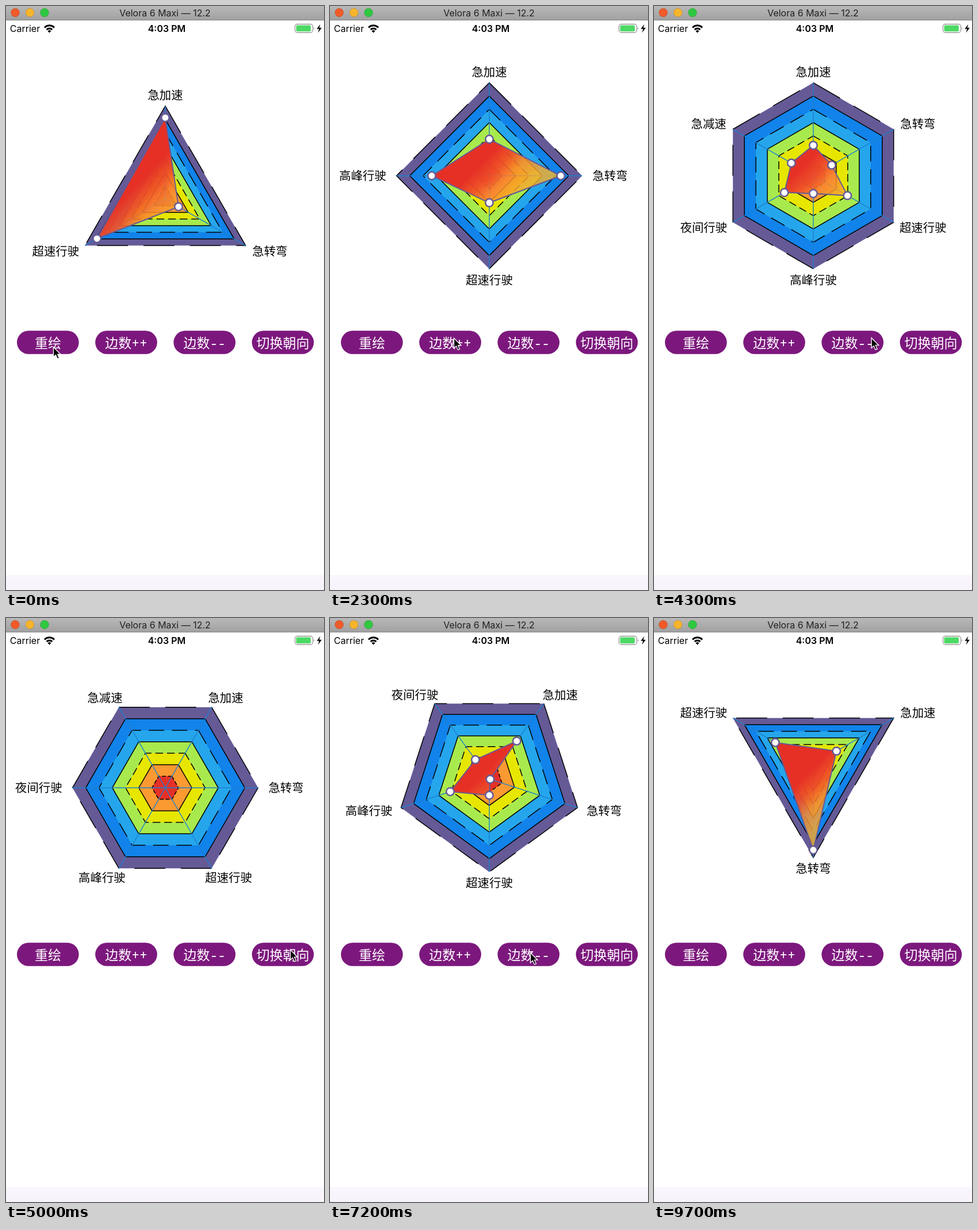
An HTML page for the animation above (10 s loop, 553 by 1013 pixels).

```html
<!DOCTYPE html>
<html lang="zh">
<head>
<meta charset="utf-8">
<title>Radar chart</title>
<style>
  html, body { margin: 0; width: 100%; height: 100%; overflow: hidden; background: #fff; }
  svg { display: block; width: 553px; height: 1013px; }
  text { text-anchor: middle; }
  .ui { font: 400 16px Inter, sans-serif; }
  .label { font: 500 20.4px "Noto Sans CJK SC", "Noto Sans CJK", sans-serif; }
  .btn { font: 300 23px "Noto Sans CJK SC", "Noto Sans CJK", sans-serif; fill: #fff; }
  .sign { font-family: "Noto Sans Mono", monospace; }
</style>
</head>
<body>
<svg viewBox="0 0 553 1013">
  <defs>
    <linearGradient id="bar" x2="0" y2="1">
      <stop stop-color="#b8b8b8"/><stop offset="1" stop-color="#a0a0a0"/>
    </linearGradient>
    <linearGradient id="foot" x2="0" y2="1">
      <stop stop-color="#faf6fd"/><stop offset="1" stop-color="#f8f3fb"/>
    </linearGradient>
    <linearGradient id="heat" gradientUnits="userSpaceOnUse" x1="260" y1="260" x2="365" y2="365">
      <stop offset=".08" stop-color="#e63026"/>
      <stop offset=".26" stop-color="#ef4f28" stop-opacity=".93"/>
      <stop offset=".41" stop-color="#f7852f" stop-opacity=".86"/>
      <stop offset=".62" stop-color="#f7a82d" stop-opacity=".82"/>
      <stop offset="1" stop-color="#e6c424" stop-opacity=".78"/>
    </linearGradient>
  </defs>

  <rect width="553" height="1013" fill="#fff"/>
  <rect y="987" width="553" height="26" fill="url(#foot)"/>
  <rect width="553" height="25" fill="url(#bar)"/>
  <rect y="24" width="553" height="1" fill="#858585"/>
  <g stroke-opacity=".15" stroke="#000">
    <circle cx="16" cy="11.5" r="7.5" fill="#f15a29"/>
    <circle cx="41.5" cy="11.5" r="7.5" fill="#f6b42c"/>
    <circle cx="67" cy="11.5" r="7.5" fill="#2fc840"/>
  </g>
  <text class="ui" x="276.5" y="17.5" fill="#222">Velora 6 Maxi — 12.2</text>

  <text class="ui" x="33" y="45">Carrier</text>
  <text class="ui" x="279.5" y="45" style="font-weight:600">4:03 PM</text>
  <g fill="none" stroke="#000" stroke-width="3">
    <path d="M67 37.3a12.2 12.2 0 0 1 17 0"/>
    <path d="M70.6 41a7 7 0 0 1 9.8 0"/>
  </g>
  <path d="M75.500 46.500l-3-3a4.300 4.300 0 0 1 6 0z"/>
  <rect x="502.500" y="31.500" width="31" height="14.500" rx="4" fill="none" stroke="#999" stroke-width="1.300"/>
  <rect x="504.500" y="33.500" width="25.500" height="10.500" rx="2" fill="#4cd964"/>
  <path d="M535 36.500q2.500 2.300 0 4.600z" fill="#999"/>
  <path d="M546.500 31.500l-6 8.200h4l-2 6.800 6.500-8.700h-4.200z"/>

  <g id="buttons"></g>
  <g id="chart"></g>
  <g id="data">
    <path id="area" fill="url(#heat)" stroke="#655a96" stroke-width="2"/>
    <g id="dots" fill="#fff" stroke="#655a96" stroke-width="2.5"></g>
  </g>
  <path id="cursor" d="M0 0V17.500L4 13.800L7 20.500L10 19.200L7.100 12.700H12.500Z" stroke="#fff" stroke-width="1.300"/>
</svg>
<script>
const $ = id => document.getElementById(id);
const CX = 277, CY = 294.5, R = 161.4, GROW = 1100, LOOP = 10000;
const NAMES = ['急加速', '急转弯', '超速行驶', '高峰行驶', '夜间行驶', '急减速'];
const COLORS = ['#e63026', '#fb9a31', '#e7e600', '#a8ea4d', '#25a6ec', '#1183ea', '#655a96'];

// each scene: start time, flipped orientation, one value per axis
const SCENES = [
  { at: -GROW, flip: 0, v: [.875, .165, .85] },
  { at: 100, flip: 0, v: [.52, .74, .43] },
  { at: 1200, flip: 0, v: [.393, .77, .29, .62] },
  { at: 2400, flip: 0, v: [.745, .453, .667, .615, .17] },
  { at: 3700, flip: 0, v: [.6, .42, .78, .35, .66, .5] },
  { at: 5000, flip: 1, v: [.48, .72, .36, .81, .55, .4] },
  { at: 6100, flip: 1, v: [.503, .01, .176, .443, .255] },
  { at: 7300, flip: 1, v: [.58, .86, .37, .69] },
  { at: 8600, flip: 1, v: [.289, .918, .473] }
];

// cursor stops: time, x, y
const STOPS = [
  [100, 82.5, 591.5], [1000, 215.5, 576], [3800, 215.5, 576], [4700, 494.5, 575.5],
  [5100, 494.5, 575.5], [5900, 348.5, 580.5], [9100, 348.5, 580.5]
];

const path = pts => 'M' + pts.map(p => p.map(c => c.toFixed(2)).join(' ')).join('L') + 'Z';

function layout(s) {
  const n = s.v.length, odd = n % 2;
  const shift = odd ? R * (1 - Math.cos(Math.PI / n)) / 2 : 0;
  s.cy = CY + (s.flip ? -shift : shift);
  s.dirs = s.v.map((_, i) => {
    const a = -Math.PI / 2 + (2 * i + s.flip) * Math.PI / n;
    return [Math.cos(a), Math.sin(a)];
  });
  s.point = (i, r) => [CX + s.dirs[i][0] * r, s.cy + s.dirs[i][1] * r];
}
SCENES.forEach(layout);

function drawChart(s) {
  let out = '';
  for (let k = 7; k > 0; k--) {
    const ring = path(s.dirs.map((_, i) => s.point(i, R * k / 7)));
    const dash = R / 3 / 2 ** ((7 - k) / 2);
    out += `<path d="${ring}" fill="${COLORS[k - 1]}" stroke="#000" stroke-width="1.5"` +
      (k % 2 ? ` stroke-dasharray="${dash} ${dash / 2}"/>` : '/>');
  }
  s.dirs.forEach(([dx, dy], i) => {
    const [x, y] = s.point(i, R);
    const half = NAMES[i].length * 10.2;
    out += `<path d="M${CX} ${s.cy}L${x} ${y}" stroke="#1d7fd0" stroke-width="1.4"/>` +
      `<text class="label" x="${x + dx * (half + 18)}" y="${y + dy * 19 + 7.6}">${NAMES[i]}</text>`;
  });
  $('chart').innerHTML = out;
  $('dots').innerHTML = '<circle r="6.7"/>'.repeat(s.v.length);
}

function drawData(s, p) {
  $('data').style.display = p > 0 ? '' : 'none';
  const pts = s.v.map((v, i) => s.point(i, R * v * p));
  $('area').setAttribute('d', path(pts));
  pts.forEach(([x, y], i) => {
    const dot = $('dots').children[i];
    dot.setAttribute('cx', x);
    dot.setAttribute('cy', y);
  });
}

function drawCursor(t) {
  const last = STOPS[STOPS.length - 1];
  $('cursor').style.display = t < last[0] ? '' : 'none';
  let i = STOPS.findIndex(s => s[0] > t);
  if (i < 0) return;
  const b = STOPS[i], a = STOPS[Math.max(0, i - 1)];
  const u = a === b ? 0 : (t - a[0]) / (b[0] - a[0]);
  const e = u * u * (3 - 2 * u);
  $('cursor').setAttribute('transform',
    `translate(${a[1] + (b[1] - a[1]) * e} ${a[2] + (b[2] - a[2]) * e})`);
}

$('buttons').innerHTML = [['重绘', ''], ['边数', '++'], ['边数', '--'], ['切换朝向', '']]
  .map(([name, sign], i) => {
    const x = 19 + i * 136.2;
    return `<rect x="${x}" y="563.3" width="107.7" height="40.4" rx="20.200" fill="#7c187d"/>` +
      `<text class="btn" x="${x + 53.9}" y="593">${name}<tspan class="sign">${sign}</tspan></text>`;
  }).join('');

let shown;
function render(ms) {
  const t = Math.floor(ms % LOOP / 100) * 100;
  const s = SCENES.filter(c => c.at <= t).pop();
  if (s !== shown) drawChart(shown = s);
  drawData(s, Math.min(1, (t - s.at) / GROW));
  drawCursor(t);
}

let start;
function tick(now) {
  start ??= now;
  render(now - start);
  requestAnimationFrame(tick);
}
render(0);
requestAnimationFrame(tick);
</script>
</body>
</html>
```
